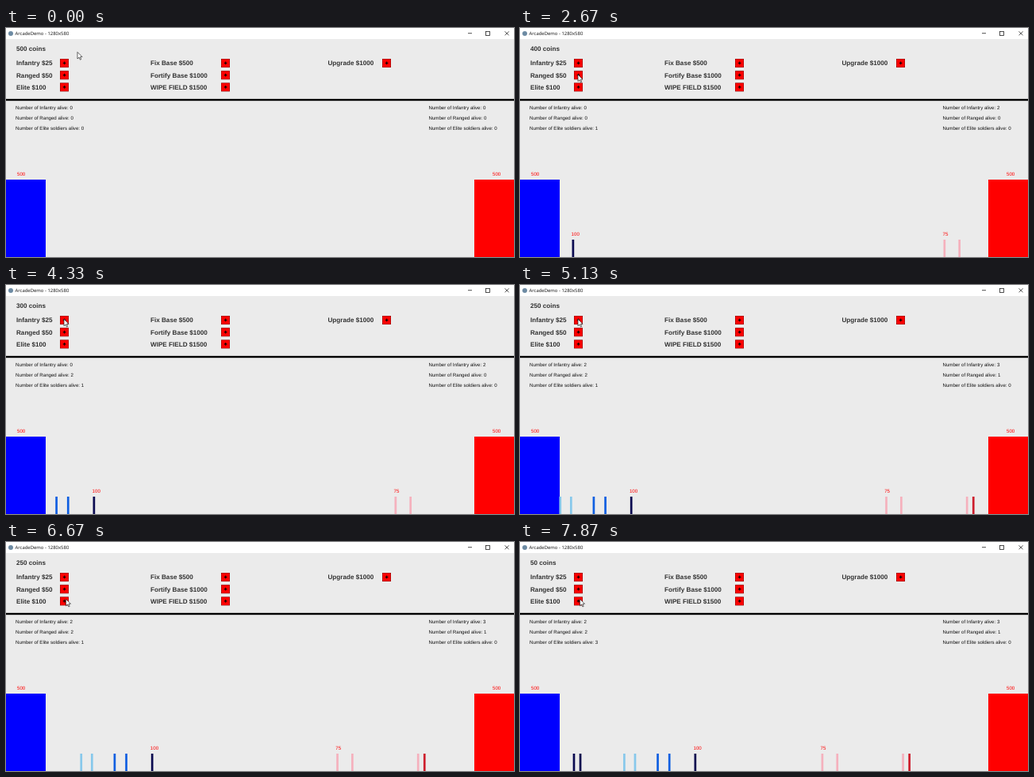
An HTML page with a canvas that plays this animation: 640 px wide and 290 px high, repeating every 8 s.

```html
<!DOCTYPE html>
<html lang="en">
<head>
<meta charset="utf-8">
<title>ArcadeDemo</title>
<style>
html, body { margin: 0; width: 100%; height: 100%; overflow: hidden; background: #ebebeb; }
canvas { display: block; }
</style>
</head>
<body>
<canvas id="stage" width="640" height="290"></canvas>
<script>
const ctx = document.getElementById('stage').getContext('2d');
const LOOP = 8000, FPS = 15, STEP = 7.33;
const SMALL = '6.13px "Liberation Sans", Arial, sans-serif';
const BOLD = 'bold 8.15px "Liberation Sans", Arial, sans-serif';
const TITLE = '5.95px "Open Sans", sans-serif';

const KINDS = [
  { name: 'Infantry', cost: 25, health: 75, blue: '#87c8eb', red: '#f5b1bd' },
  { name: 'Ranged', cost: 50, health: 75, blue: '#0f5fe1', red: '#cd1e2d' },
  { name: 'Elite soldiers', cost: 100, health: 100, blue: '#0a0a50', red: '#500a0a' }
];

// births: for each kind, the game ticks at which soldiers leave their base
const BLUE = { color: 'blue', dir: 1, gate: 50.4, baseX: 0, fill: '#00f', textX: 12, healthX: 14,
  births: [[18.1, 19.95], [12.2, 14.2], [7.75, 27.5, 28.6]] };
const RED = { color: 'red', dir: -1, gate: 590.3, baseX: 590, fill: '#f00', textX: 532.5, healthX: 613,
  births: [[2.43, 5, 16.3], [17.4], []] };

const MENU = [
  { x: 13, buttonX: 68, labels: ['Infantry $25', 'Ranged $50', 'Elite $100'] },
  { x: 182, buttonX: 271, labels: ['Fix Base $500', 'Fortify Base $1000', 'WIPE FIELD $1500'] },
  { x: 405.5, buttonX: 474, labels: ['Upgrade $1000'] }
];

// the pointer rests at each stop and glides between them
const STOPS = [
  { from: 0, to: 5, x: 90, y: 30.5 },
  { from: 6, to: 9, x: 115, y: 58 },
  { from: 14, to: 33, x: 74, y: 74 },
  { from: 40, to: 58, x: 73, y: 59 },
  { from: 65, to: 86, x: 73, y: 43.3 },
  { from: 100, to: 120, x: 75.5, y: 72.3 }
];

function rect(x, y, w, h, color) {
  ctx.fillStyle = color;
  ctx.fillRect(x, y, w, h);
}

function text(str, x, y, font, color) {
  ctx.font = font;
  ctx.fillStyle = color;
  ctx.fillText(str, x, y);
}

function line(width, ...points) {
  ctx.beginPath();
  points.forEach(([x, y]) => ctx.lineTo(x, y));
  ctx.strokeStyle = '#222';
  ctx.lineWidth = width;
  ctx.stroke();
}

function drawWindowBar() {
  rect(0, 0, 640, 14, '#fff');
  ctx.beginPath();
  ctx.arc(6, 7, 3, 0, 7);
  ctx.fillStyle = '#6d8ba3';
  ctx.fill();
  text('ArcadeDemo - 1280x580', 11.5, 9.2, TITLE, '#111');
  line(0.8, [582, 6.7], [587, 6.7]);
  ctx.strokeRect(604.5, 4.5, 5, 5);
  line(0.8, [628.5, 4.3], [633.5, 9.3]);
  line(0.8, [633.5, 4.3], [628.5, 9.3]);
}

function drawButton(x, y) {
  rect(x, y, 11, 11, '#800808');
  rect(x + 0.5, y + 0.5, 10, 10, '#fb0000');
  rect(x + 3.8, y + 4.8, 3.6, 1.3, '#200');
  rect(x + 4.95, y + 3.6, 1.3, 3.6, '#200');
}

function drawMenu(coins) {
  text(coins + ' coins', 13, 29.3, BOLD, '#333');
  for (const { x, buttonX, labels } of MENU) {
    labels.forEach((label, row) => {
      text(label, x, 47.3 + row * 15.2, BOLD, '#333');
      drawButton(buttonX, 39 + row * 15.2);
    });
  }
  rect(0, 89.8, 640, 2.4, '#000');
}

// Draws one side and returns how many soldiers of each kind are alive.
function drawArmy(army, tick) {
  const alive = army.births.map(births => births.filter(birth => birth <= tick));
  const place = birth => army.gate + army.dir * STEP * (tick - birth);
  rect(army.baseX, 192, 50, 98, army.fill);
  text('500', army.healthX, 187, SMALL, '#f00');
  let front = { birth: Infinity };
  KINDS.forEach((kind, i) => {
    text(`Number of ${kind.name} alive: ${alive[i].length}`, army.textX, 103.2 + i * 12.75, SMALL, '#111');
    for (const birth of alive[i]) {
      rect(place(birth) - 1.35, 268, 2.7, 22, kind[army.color]);
      if (birth < front.birth) front = { birth, health: kind.health };
    }
  });
  if (front.health) text(front.health, place(front.birth) - 2.3, 263.2, SMALL, '#f00');
  return alive.map(births => births.length);
}

function drawPointer(frame) {
  const i = STOPS.findLastIndex(stop => stop.from <= frame);
  const here = STOPS[i], next = STOPS[i + 1] || here;
  const p = frame > here.to ? (frame - here.to) / (next.from - here.to) : 0;
  const ease = p * p * (3 - 2 * p);
  ctx.save();
  ctx.translate(here.x + (next.x - here.x) * ease, here.y + (next.y - here.y) * ease);
  const arrow = new Path2D('M0 0V8.5L2 6.7 3.4 9.7 4.7 9.1 3.4 6.2 6 6Z');
  ctx.fillStyle = '#fff';
  ctx.fill(arrow);
  ctx.strokeStyle = '#222';
  ctx.lineWidth = 0.7;
  ctx.stroke(arrow);
  ctx.restore();
}

function draw(now) {
  const frame = Math.floor((now % LOOP) * FPS / 1000 + 0.1);
  const tick = Math.floor((frame / FPS - 0.11) * 4); // the game moves four times a second
  rect(0, 0, 640, 290, '#ebebeb');
  drawWindowBar();
  const bought = drawArmy(BLUE, tick);
  drawArmy(RED, tick);
  drawMenu(bought.reduce((coins, count, i) => coins - count * KINDS[i].cost, 500));
  drawPointer(frame);
  requestAnimationFrame(draw);
}

ctx.textRendering = 'geometricPrecision';
requestAnimationFrame(draw);
</script>
</body>
</html>
```
